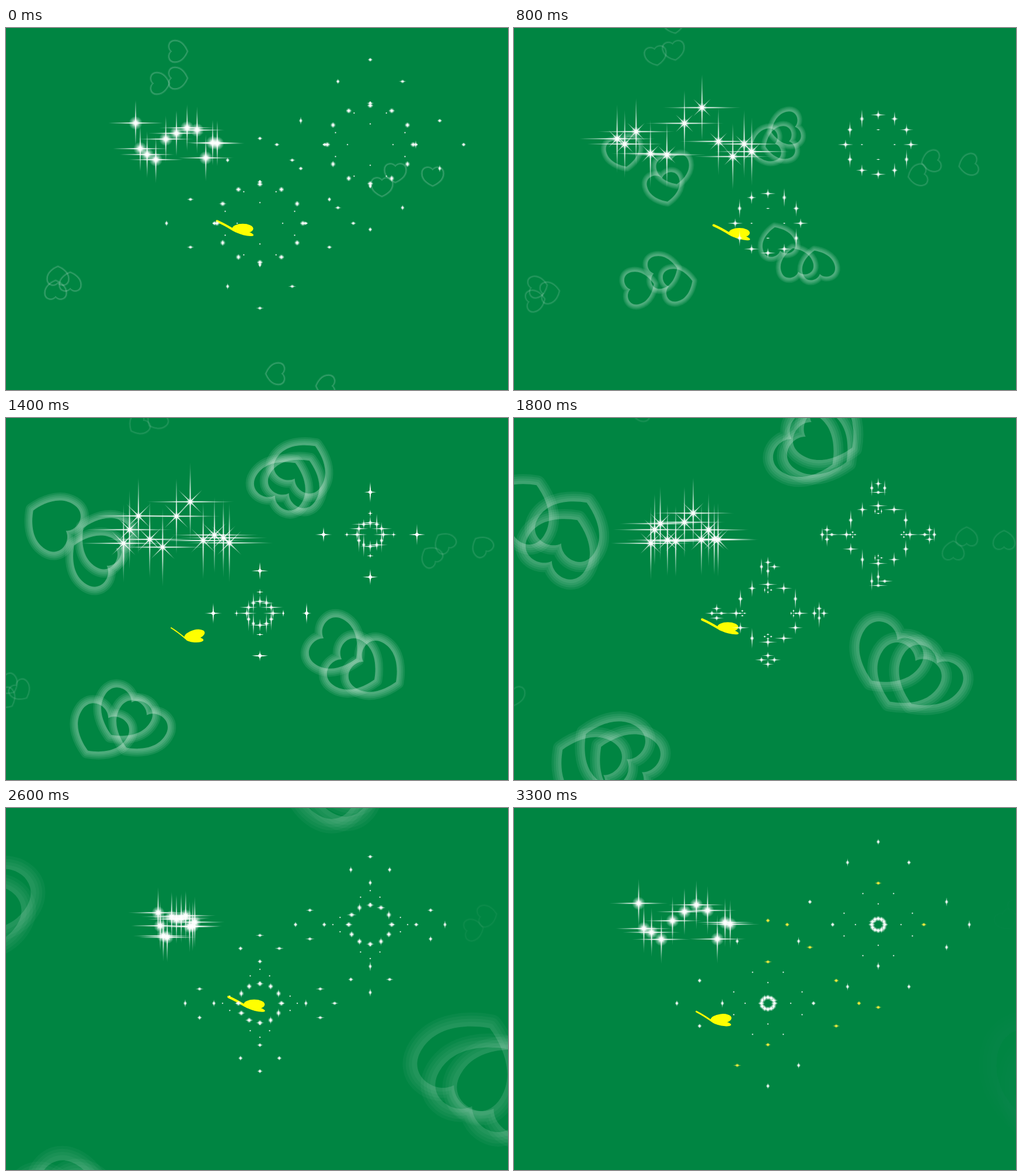
Write an HTML page with a canvas that moves like this. It is 860 px wide and 621 px high and loops after 3400 ms.

```html
<!DOCTYPE html>
<html>
<head>
<meta charset="utf-8">
<title>Butterfly, hearts and sparkles</title>
<style>
html, body { margin: 0; width: 100%; height: 100%; overflow: hidden; background: #008542; }
canvas { display: block; }
</style>
</head>
<body>
<canvas id="stage" width="860" height="621"></canvas>
<script>
const ctx = document.getElementById('stage').getContext('2d');
const STEP = 100, STEPS = 34;
const { PI, sin, cos, min, max, abs, floor } = Math;
const DEG = PI / 180;
const mix = (a, b, k) => a + (b - a) * k;
const rnd = (a, b) => { const v = sin(a * 12.99 + b * 78.23) * 43758.5; return v - floor(v); };

function makeGlow(rgb) {
  const g = ctx.createRadialGradient(0, 0, 0, 0, 0, 1);
  [[0, 1], [.3, .85], [.6, .4], [1, 0]].forEach(([at, a]) => g.addColorStop(at, `rgba(${rgb},${a})`));
  return g;
}
const white = makeGlow('255,255,255'), gold = makeGlow('255,240,60');

function ellipse(x, y, rx, ry, angle, fill) {
  ctx.save();
  ctx.translate(x, y);
  ctx.rotate(angle);
  ctx.scale(rx, ry);
  ctx.fillStyle = fill;
  ctx.beginPath();
  ctx.arc(0, 0, 1, 0, 2 * PI);
  ctx.fill();
  ctx.restore();
}

// ---- hearts: unit size, tip pointing down ----
const heart = new Path2D('M0 .5C-.2 .42-.55 .22-.55-.14C-.55-.5-.13-.52 0-.3C.13-.52 .55-.5 .55-.14C.55 .22 .2 .42 0 .5Z');
const outside = new Path2D();
outside.rect(-3, -3, 6, 6);
outside.addPath(heart, new DOMMatrix([.95, 0, 0, .95, 0, 0]));

// each trio drifts along its own heading; the next trio is turned by a quarter
const bigTrios = [
  { heading: -65, speed: 165, at: [[480, 143], [446, 172], [470, 168]] },
  { heading: 12, speed: 192, at: [[490, 375], [521, 411], [558, 415]] },
  { heading: 120, speed: 175, at: [[237, 448], [197, 475], [263, 470]] },
  { heading: 197, speed: 184, at: [[152, 202], [238, 232], [222, 262]] }
];
const smallTrios = [
  [[294, 40], [294, 86], [263, 95]],
  [[667, 248], [644, 272], [731, 254]],
  [[462, 593], [548, 614]],
  [[89, 426], [110, 436], [85, 450]]
].map((at, i) => ({ heading: -113 + 91 * i, speed: 65, at }));

function drawHearts(trios, dt, turn, spin, size, widths, alpha) {
  ctx.strokeStyle = `rgba(255,255,255,${alpha})`;
  ctx.lineJoin = 'round';
  trios.forEach(({ heading, speed, at }, i) => {
    const dx = cos(heading * DEG) * speed * dt, dy = sin(heading * DEG) * speed * dt;
    for (const [x, y] of at) {
      ctx.save();
      ctx.translate(x + dx, y + dy);
      ctx.rotate((turn + 90 * i + spin * dt) * DEG);
      ctx.scale(size, size);
      ctx.clip(outside, 'evenodd');
      for (const w of widths) {
        ctx.lineWidth = w;
        ctx.stroke(heart);
      }
      ctx.restore();
    }
  });
}

// ---- stars ----
function star(x, y, core, rx, ry, diag = 0, thick = 1.4, fill = white) {
  ellipse(x, y, core, core, 0, fill);
  if (rx) ellipse(x, y, rx, thick, 0, fill);
  if (ry) ellipse(x, y, thick, ry, 0, fill);
  if (diag) [45, -45].forEach(a => ellipse(x, y, diag, thick * .8, a * DEG, fill));
}

// vertical swing of the cluster stars from left to right: middle, height, phase
const swings = [
  [190, 27, 0], [199, 8, 180], [195, 28, 218], [217, 9, 190], [204, 19, 45], [177, 14, 255],
  [162, 27, 250], [193, 18, 5], [209, 18, 140], [202, 6, -30], [205, 10, 45]
];

function drawSwarm(t, shine) {
  const phase = 2 * PI * (t - .8) / 3.2;
  const spread = 1 + .6 * cos(phase - .05);
  swings.forEach(([mid, height, lag], i) => {
    const x = 292 + 76 * sin(1.25 * (i / 5 - 1)) * spread;
    const y = mid + height * sin(phase + lag * DEG);
    star(x, y, 9.5 - 2.5 * shine, 62 + 14 * shine, 54 + 14 * shine, max(0, 17 + 13 * shine), 1.7);
  });
}

// ---- fireworks: a repeating ring, then bursts on the four axes ----
function drawFirework(cx, cy, t, step, shine) {
  const squash = .91, seed = cx + step;
  const r = 80 * ((t + .92) % 1.02), ray = 15 + 8 * shine;
  for (let i = 0; i < 12; i++) {
    const a = i * PI / 6, flat = i % 3 ? rnd(i, seed) : .8;
    star(cx + r * cos(a), cy + r * squash * sin(a), 4.4 - .6 * shine, ray * flat, ray * (1 - flat * .6));
  }

  const late = t < .1 ? t + 3.4 : t;
  if (late < 1.1) {
    for (let i = 0; i < 4; i++)
      star(cx + r / 2 * cos(i * PI / 2), cy + r / 2 * squash * sin(i * PI / 2), 1.5, 4, 0, 0, .8);
    return;
  }
  const reach = 80 + 19.5 * (late - 1.4), spread = 20.5 * max(0, late - 1.4);
  for (const size of [.5, 1])
    for (let i = 0; i < 16; i++) {
      const a = floor(i / 4) * PI / 2, b = (i % 4) * PI / 2;
      const upright = floor(i / 4) % 2;
      const x = cx + size * (reach * cos(a) + spread * (upright ? 1.35 : 1) * cos(b));
      const y = cy + size * (reach * squash * sin(a) + spread * (upright ? squash : 1) * sin(b));
      const flat = rnd(i + 20, seed);
      const len = size < 1 ? max(0, 8 * shine) : 13 + 6 * shine;
      star(x, y, 3.6 * size, len * flat, len * (1.1 - flat), 0, .4 + .8 * size,
        size === 1 && t > 3 && flat > .55 ? gold : white);
    }
}

// ---- butterfly: glides to and fro, wings snap up and sink ----
function drawButterfly(t, step) {
  const swing = abs((t + .8) % 2.2 - 1.1) / 1.1;
  const flap = max(0, cos((step + 8) % 9 / 8 * 2.2));
  const hx = mix(28, 19, flap), hy = mix(16, 22, flap);
  ctx.save();
  ctx.translate(390 - 108 * swing, 319.5 + 39.5 * swing);
  ctx.strokeStyle = '#ff0';
  ctx.lineCap = 'round';
  ctx.lineWidth = 4 - 2 * sin(PI * flap);
  ctx.beginPath();
  ctx.moveTo(1, 1);
  ctx.quadraticCurveTo(hx * .5, hy * .42, hx + 1, hy);
  ctx.stroke();
  ctx.translate(hx, hy);
  ellipse(17, mix(-2, -10, flap), 18, 8.5, mix(0, -.6, flap), '#ff0');
  ellipse(mix(19, 15, flap), mix(5, -1, flap), mix(17, 13, flap), mix(4, 6, flap), mix(.25, -.15, flap), '#ff0');
  ctx.restore();
}

function draw(now) {
  const step = floor(now / STEP) % STEPS, t = step * STEP / 1000;
  const shine = cos((t - 1.4) * 2 * PI / 3.2);
  ctx.fillStyle = '#008542';
  ctx.fillRect(0, 0, 860, 621);
  drawHearts(smallTrios, t, -90, 100, 33, [.14, .07], .1 * max(0, 1 - t / 3.4));
  if (t > 0) {
    const fade = min(1, t / .4, (3.4 - t) / 2);
    drawHearts(bigTrios, t - 1, 122, 225, (13 + 68 * t) / 1.25, [.27, .2, .13, .06], .085 * fade);
  }
  drawButterfly(t, step);
  drawFirework(624, 200, t, step, shine);
  drawFirework(435, 335, t, step, shine);
  drawSwarm(t, shine);
}

const start = performance.now();
function tick() {
  draw(performance.now() - start);
  requestAnimationFrame(tick);
}
tick();
</script>
</body>
</html>
```
